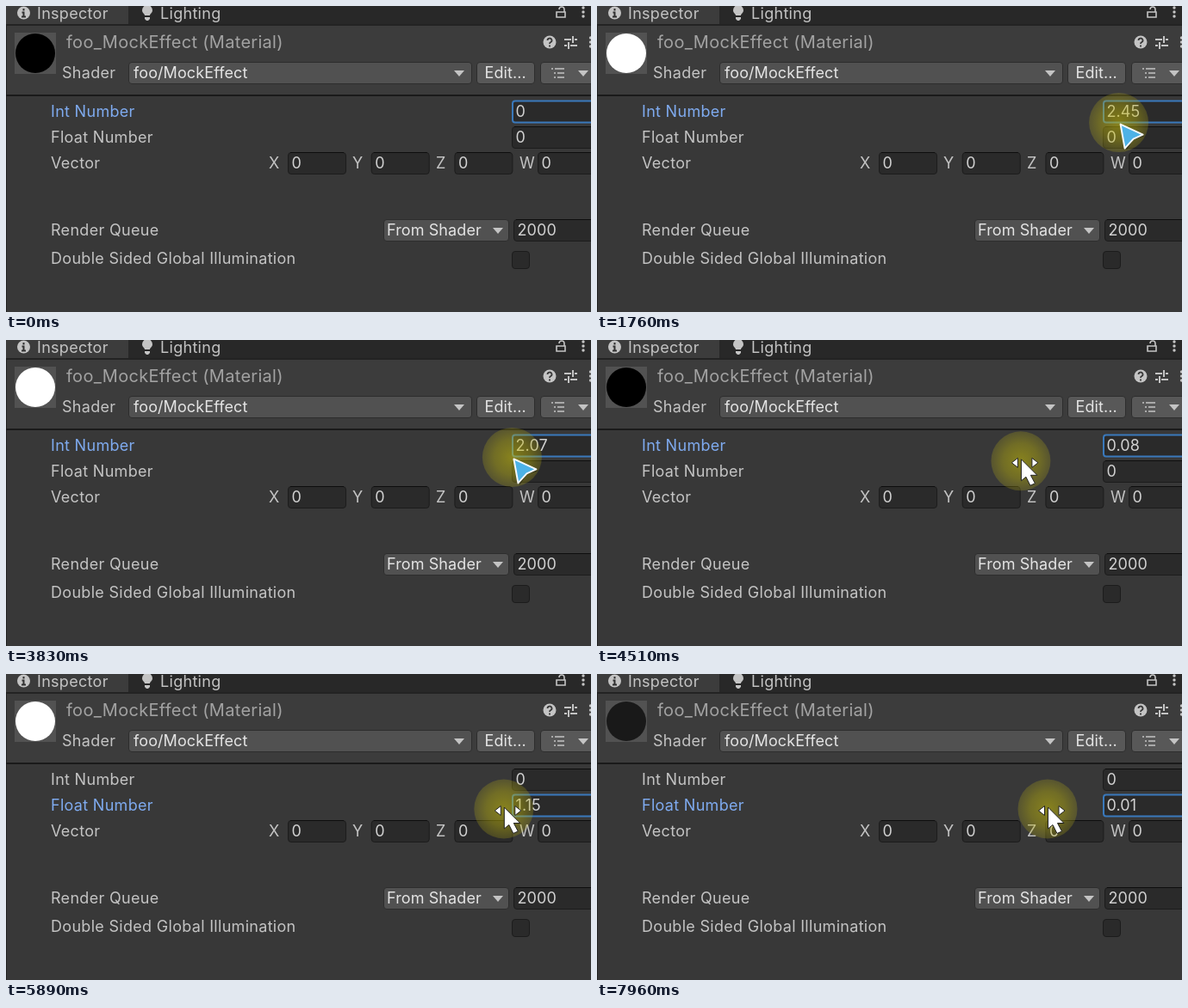
These frames come from a looping animation (679x356 px, 7990 ms). An HTML page:

```html
<!DOCTYPE html>
<html lang="en">
<head>
<meta charset="utf-8">
<title>Material inspector</title>
<style>
  html, body { margin: 0; width: 100%; height: 100%; overflow: hidden; background: #383838; }
  svg { display: block; }
  text { font: 18px Inter, sans-serif; letter-spacing: .3px; fill: #c4c4c4; white-space: pre; }
  .title { font-size: 20px; fill: #a2a2a2; }
  .value { fill: #d2d2d2; letter-spacing: .1px; }
  .bright { fill: #e4e4e4; letter-spacing: .1px; }
  .field { fill: #2a2a2a; stroke: #1c1c1c; }
  .popup { fill: #515151; stroke: #2d2d2d; }
  .button { fill: #585858; stroke: #2d2d2d; }
  .icon { fill: #c4c4c4; }
  .line { fill: none; stroke: #c4c4c4; stroke-width: 2; }
  .focus { fill: none; stroke: #3a79bb; stroke-width: 2; }
  .active { fill: #7fabf0; }
</style>
</head>
<body>
<svg id="stage" width="679" height="356" viewBox="0 0 679 356"></svg>
<script>
const LOOP = 7990;
const FIELD_X = 587;

const text = (x, y, s, cls = '', id = '') => `<text x="${x}" y="${y}" class="${cls}" id="${id}">${s}</text>`;
const box = (x, y, w, h, cls) => `<rect x="${x + .5}" y="${y + .5}" width="${w - 1}" height="${h - 1}" rx="3.5" class="${cls}"/>`;
const down = (x, y) => `<path class="icon" d="M${x - 6} ${y - 3}h12l-6 7z"/>`;
const field = (x, y, w, s, id) =>
  box(x, y, w, 26, 'field') + `<path d="M${x + 3} ${y + .5}h${w - 6}" stroke="#0d0d0d"/>` + text(x + 4.5, y + 19, s, 'value', id);
const dots = (x, y) => [-5, 0, 5].map(d => `<circle class="icon" cx="${x}" cy="${y + d}" r="1.7"/>`).join('');

const tabs = `
  <rect width="679" height="356" fill="#383838"/>
  <rect width="679" height="104" fill="#3c3c3c"/>
  <rect x="142" width="537" height="21" fill="#282828"/>
  <path d="M0 22h679" stroke="#232323" stroke-width="2"/>
  <path d="M.5 21v335" stroke="#232323"/>
  <circle class="icon" cx="20.5" cy="8" r="7.5"/>
  <path d="M20.5 3v2.4M18.5 7.5h2v5M18 12.5h5" fill="none" stroke="#303030" stroke-width="2"/>
  ${text(36, 15, 'Inspector')}
  <path class="icon" d="M161 11c0-2-3-3-3-6a6 6 0 0 1 12 0c0 3-3 4-3 6zM161 13h6v2l-2 2h-2l-2-2z"/>
  ${text(179, 15, 'Lighting')}
  <path class="line" d="M639 7h10v6h-10zM648 7v-3a3 3 0 0 0-6 0" style="stroke-width:1.6"/>
  ${dots(670, 7)}`;

const header = `
  <rect x="10" y="31" width="48" height="48" fill="#525252"/>
  <circle id="ball" cx="34" cy="55" r="23"/>
  ${text(70, 49, 'foo_MockEffect (Material)', 'title')}
  <circle class="icon" cx="631" cy="42" r="7.5"/>
  <path d="M628.5 40a2.5 2.5 0 1 1 3.5 2.3q-1 .5-1 1.7M631 45.5v2" fill="none" stroke="#383838" stroke-width="1.8"/>
  <path class="line" d="M648 39h8M660 39h3M648 46h3M655 46h8M658 35v8M653 42v8"/>
  ${dots(678.5, 42)}
  ${text(65, 84, 'Shader')}
  ${box(142, 65, 399, 26, 'popup')}${text(148, 84, 'foo/MockEffect', 'bright')}${down(526, 78)}
  ${box(546, 65, 68, 26, 'button')}${text(555.5, 84, 'Edit...', 'bright')}
  ${box(620, 65, 70, 26, 'button')}${down(670, 78)}
  <path class="line" d="M633 73h2M637 73h11M636 78h2M640 78h8M636 83h2M640 83h8" style="stroke-width:1.6"/>
  <path d="M0 104h679" stroke="#1a1a1a" stroke-width="2"/>`;

const axes = [...'XYZW'].map((name, i) => text(305 + 97 * i, 189, name) + field(327 + 96.7 * i, 170, 68, '0')).join('');
const body = `
  ${text(52, 129, 'Int Number', '', 'intLabel')}${field(FIELD_X, 110, 110, '0', 'intValue')}
  ${text(52, 159, 'Float Number', '', 'floatLabel')}${field(FIELD_X, 140, 110, '0', 'floatValue')}
  ${text(52, 189, 'Vector')}
  ${axes}
  <rect id="focus" class="focus" x="588" width="110" height="25" rx="3"/>
  ${text(52, 267, 'Render Queue')}
  ${box(438, 248, 146, 26, 'popup')}${text(442, 267, 'From Shader', 'bright')}${down(571, 261)}
  ${field(589, 248, 110, '2000')}
  ${text(52, 300, 'Double Sided Global Illumination')}
  ${box(FIELD_X, 285, 21, 21, 'field')}`;

const cursor = `
  <radialGradient id="glow">
    <stop offset="0" stop-color="#c8be08" stop-opacity=".56"/>
    <stop offset=".6" stop-color="#c0b60c" stop-opacity=".42"/>
    <stop offset="1" stop-color="#b8ae14" stop-opacity=".24"/>
  </radialGradient>
  <g id="cursor">
    <circle r="34.5" fill="url(#glow)"/>
    <circle id="ring" cx="-4" cy="1" r="11" fill="none" stroke="#f01a08" stroke-width="3"/>
    <g id="dragArrow" fill="#fff" stroke="#222">
      <path d="M.5-2v25l5.5-4.500 5 10 5.500-2.500-5-9.500h7.500z"/>
      <path d="M-10.500 2l7-5.500v11zM20 2l-7-5.500v11z"/>
    </g>
    <g id="blueArrow">
      <path d="M3 4l27 12-13 4-8 12z" fill="#0005"/>
      <path d="M2 2l26 12-11 5-10 11z" fill="#4db2e6" stroke="#f4f8fa" stroke-width="2" stroke-linejoin="round"/>
    </g>
  </g>`;

const stage = document.getElementById('stage');
stage.innerHTML = tabs + header + body + cursor;
const el = {};
stage.querySelectorAll('[id]').forEach(node => { if (node.id) el[node.id] = node; });

const INT_PRESS = 870, INT_RELEASE = 4840;
const FLOAT_FOCUS = 4900, FLOAT_DRAG = 5370;
const PIXELS_PER_UNIT = 48;
const START_VALUE = -6.4;

// start time, end time, value the pointer is dragged to
const moves = [
  [50, 600, .45], [600, 860, 0],
  [INT_PRESS, 1640, 2.45], [1780, 2910, .35], [3060, 3830, 2.07], [3930, 4590, 0],
  [INT_RELEASE, 4980, -.18], [5130, 5360, -.09],
  [FLOAT_DRAG, 5960, 1.2], [5960, 6560, 1.34], [6760, 7540, -.11], [7570, 7640, -.06], [7910, 7960, .01]
];

function ease(t, start, end) {
  const u = Math.min(1, Math.max(0, (t - start) / (end - start)));
  return u * u * (3 - 2 * u);
}
const mix = (a, b, u) => a + (b - a) * u;
const dragAt = t => moves.reduce((value, [start, end, to]) => mix(value, to, ease(t, start, end)), START_VALUE);

function pointerAt(t, drag) {
  const toFloat = ease(t, INT_RELEASE, 4980);
  const rowY = mix(141 - 2.2 * Math.max(0, drag), 157, toFloat);
  return {
    x: mix(488, 522.5, toFloat) + drag * PIXELS_PER_UNIT,
    y: mix(-45, rowY, ease(t, 50, 700))
  };
}

function linearToSrgb(v) {
  const c = Math.min(1, Math.max(0, v));
  return Math.round(255 * (c <= .0031308 ? 12.92 * c : 1.055 * c ** (1 / 2.4) - .055));
}

const show = (node, visible) => node.setAttribute('visibility', visible ? 'visible' : 'hidden');
const within = (t, start, end) => t >= start && t < end;

function draw(now) {
  const t = now % LOOP;
  const drag = dragAt(t);
  const { x, y } = pointerAt(t, drag);
  const onFloat = t >= FLOAT_FOCUS;
  const dragging = within(t, INT_PRESS, INT_RELEASE) || t >= FLOAT_DRAG;
  const value = dragging ? Math.round(drag * 100) / 100 : 0;

  el.intValue.textContent = onFloat ? '0' : String(value);
  el.floatValue.textContent = onFloat ? String(value) : '0';
  el.intLabel.setAttribute('class', onFloat ? '' : 'active');
  el.floatLabel.setAttribute('class', onFloat ? 'active' : '');
  el.focus.setAttribute('y', onFloat ? 140.5 : 110.5);

  const shade = linearToSrgb(onFloat ? value : Math.floor(value));
  el.ball.setAttribute('fill', `rgb(${shade},${shade},${shade})`);

  const overLabel = y > 108 && x < FIELD_X;
  el.cursor.setAttribute('transform', `translate(${x.toFixed(1)} ${y.toFixed(1)})`);
  show(el.dragArrow, overLabel);
  show(el.blueArrow, !overLabel);
  show(el.ring, within(t, INT_PRESS, 1170) || within(t, FLOAT_FOCUS, 5400));
  requestAnimationFrame(draw);
}
requestAnimationFrame(draw);
</script>
</body>
</html>
```
